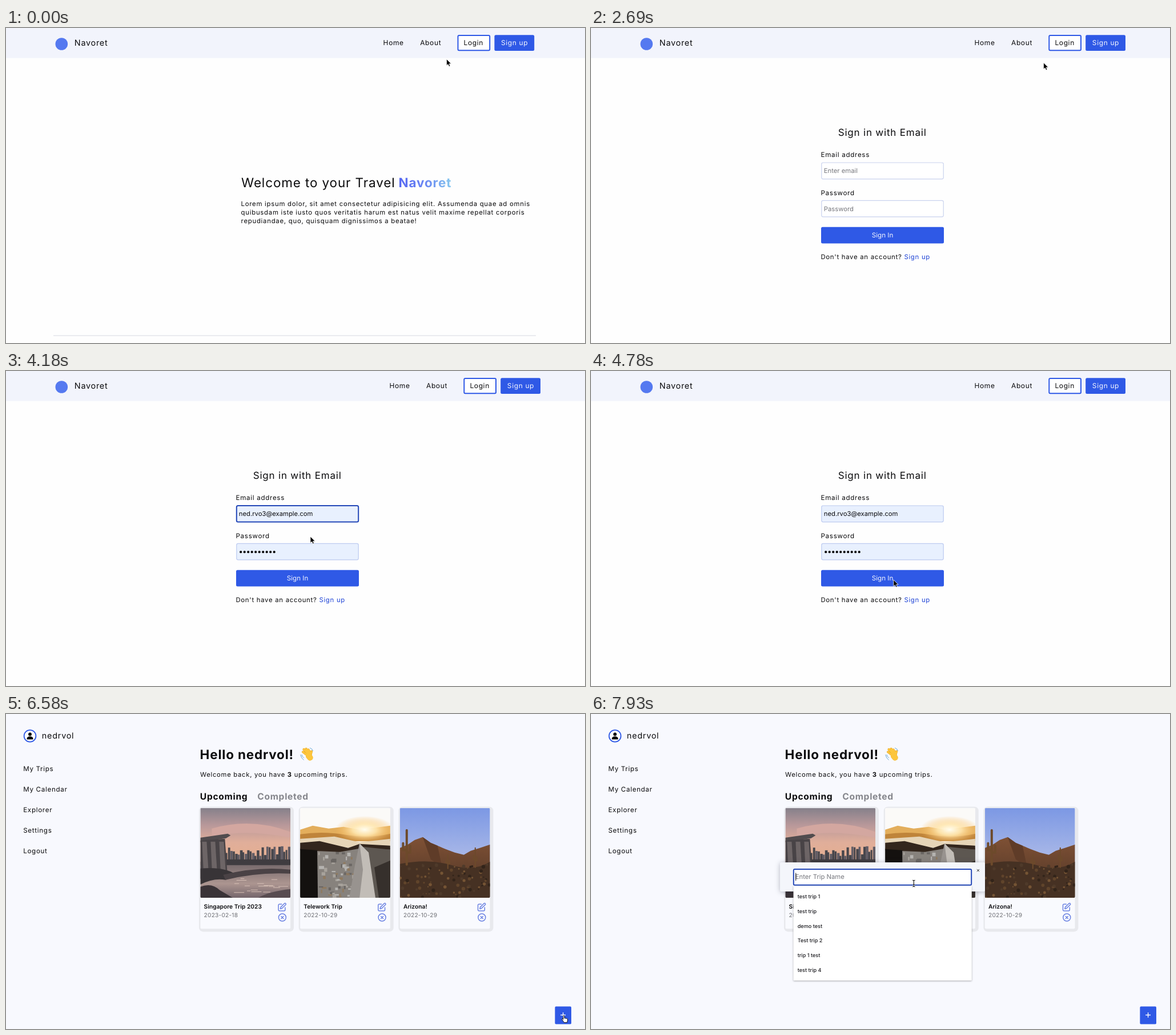
An HTML page that plays this animation: 1014x552 px, repeating every 8 s.

```html
<!DOCTYPE html>
<html lang="en">
<head>
<meta charset="utf-8">
<title>Travel planner walkthrough</title>
<style>
  html, body { margin: 0; width: 100%; height: 100%; overflow: hidden; background: #f8f9fe; }
  svg { display: block; width: 1014px; height: 552px; }
  text {
    font: 400 11.27px Inter, "Open Sans", sans-serif;
    font-optical-sizing: none;
    text-rendering: geometricPrecision;
    fill: #0b0b0d;
    white-space: pre;
  }
  .body { letter-spacing: .715px; }
  .intro { font-size: 11.4px; letter-spacing: .72px; }
  .label { font-size: 11.6px; letter-spacing: .7px; }
  .foot { font-size: 11.4px; letter-spacing: .7px; }
  .nav { font-size: 12px; letter-spacing: .63px; }
  .brand { font-size: 14.4px; letter-spacing: .75px; }
  .hero { font-size: 22.5px; letter-spacing: .86px; }
  .title { font-size: 17px; letter-spacing: .8px; }
  .hello { font-size: 22.5px; font-weight: 700; letter-spacing: .8px; }
  .tab { font-size: 15.6px; font-weight: 700; letter-spacing: .7px; }
  .name { font-size: 10.2px; font-weight: 600; letter-spacing: .05px; }
  .date { font-size: 10.2px; letter-spacing: .2px; fill: #6f7075; }
  .menu { font-size: 9.1px; }
  .pick { font-size: 9.1px; font-weight: 500; fill: #1c1c20; }
  .hint { fill: #76777d; }
  .light { fill: #f4f6ff; }
  .submit { font-size: 11.6px; }
  .gray { fill: #85868c; }
  .link { fill: #1f44d6; }
  .bold { font-weight: 700; }
  .shade { fill: url(#word); }
  .solid { fill: #2f59e6; }
  .field { fill: #fff; stroke: #c9d2ee; stroke-width: 1.2; }
  .field.filled { fill: #e8f0fe; stroke: #bccaf0; }
  .field.focus { stroke: #2448b8; stroke-width: 2; }
  .caret { stroke: #111; stroke-width: 1; }
  .dots { stroke: #0b0b0d; stroke-linecap: round; }
  .icon { fill: none; stroke: #6b82e2; stroke-width: 1.5; stroke-linecap: round; stroke-linejoin: round; }
  .pop { fill: #fff; filter: drop-shadow(0 1px 1.5px rgba(0, 0, 0, .32)); }
  .panel { fill: #f4f6fb; filter: drop-shadow(0 1px 4px rgba(20, 25, 50, .3)); }
  .mark { fill: #5579f0; }
  .off { display: none; }
</style>
</head>
<body>
<svg viewBox="0 0 1014 552" xmlns="http://www.w3.org/2000/svg">
  <defs>
    <linearGradient id="word"><stop stop-color="#5668f2"/><stop offset=".5" stop-color="#6a86f3"/><stop offset="1" stop-color="#86c8ee"/></linearGradient>
    <linearGradient id="dusk" x2="0" y2="1"><stop stop-color="#85808a"/><stop offset=".3" stop-color="#b8989a"/><stop offset=".6" stop-color="#e0ae9a"/><stop offset="1" stop-color="#e8b08e"/></linearGradient>
    <linearGradient id="bay" x2="0" y2="1"><stop stop-color="#6f6467"/><stop offset=".6" stop-color="#ac9590"/><stop offset="1" stop-color="#73646a"/></linearGradient>
    <linearGradient id="noon" x2="0" y2="1"><stop stop-color="#7c98e4"/><stop offset="1" stop-color="#b0bde8"/></linearGradient>
    <linearGradient id="rock" x2="0" y2="1"><stop stop-color="#7f5135"/><stop offset="1" stop-color="#4c3325"/></linearGradient>
    <radialGradient id="sun"><stop stop-color="#fffdf0"/><stop offset=".4" stop-color="#ffe7b0" stop-opacity=".9"/><stop offset="1" stop-color="#f9b85a" stop-opacity="0"/></radialGradient>
    <clipPath id="frame"><rect width="157.7" height="157.3" rx="2"/></clipPath>
  </defs>

  <g id="site">
    <rect width="1014" height="552" fill="#fefefe"/>
    <rect width="1014" height="52.6" fill="#f2f4fc"/>
    <circle class="mark" cx="97.3" cy="28" r="10.8"/>
    <text class="brand" x="119.8" y="31.4">Navoret</text>
    <g id="nav">
      <text class="nav" x="660.6" y="30.3">Home</text>
      <text class="nav" x="725.2" y="30.3">About</text>
      <rect x="791.5" y="13" width="55.7" height="26.2" rx="2" fill="#fff" stroke="#2f59e6" stroke-width="2"/>
      <text class="nav" x="801.6" y="30.3">Login</text>
      <rect class="solid" x="855.4" y="12.2" width="69.8" height="27.8" rx="2.5"/>
      <text class="nav light" x="867" y="30.3">Sign up</text>
    </g>
  </g>

  <g id="land">
    <text class="hero" x="412" y="279.3">Welcome to your Travel</text>
    <text class="hero bold shade" x="687.4" y="279.3">Navoret</text>
    <text class="intro" x="411.6" y="311.7">Lorem ipsum dolor, sit amet consectetur adipisicing elit. Assumenda quae ad omnis</text>
    <text class="intro" x="411.6" y="327">quibusdam iste iusto quos veritatis harum est natus velit maxime repellat corporis</text>
    <text class="intro" x="411.6" y="342.3">repudiandae, quo, quisquam dignissimos a beatae!</text>
    <path d="M83 539H928" stroke="#d6d8e0"/>
  </g>

  <g id="login">
    <text class="title" x="432.7" y="189.3">Sign in with Email</text>
    <text class="label" x="402.5" y="226.4">Email address</text>
    <rect id="email" class="field" x="403.8" y="236" width="213.4" height="28.6" rx="2.5"/>
    <text id="ask" class="hint" x="407.8" y="254">Enter email</text>
    <text id="typed" x="407.8" y="254">ned.rvo3@example.com</text>
    <path id="caret" class="caret" d="M408.7 243.5V257"/>
    <text class="label" x="402.5" y="293">Password</text>
    <rect id="pass" class="field" x="403.8" y="302.4" width="213.4" height="28.4" rx="2.5"/>
    <text id="askPass" class="hint" x="407.8" y="320.6">Password</text>
    <path id="secret" class="dots" d="M411.2 317.2h59" stroke-width="4.3" stroke-dasharray="0 6.5"/>
    <rect class="solid" x="403" y="348.8" width="215" height="28.8" rx="2.5"/>
    <text class="submit light" x="491.8" y="367.2">Sign In</text>
    <text class="foot" x="402.4" y="405.3">Don't have an account? <tspan class="link">Sign up</tspan></text>
    <g id="saved">
      <rect class="pop" x="403" y="266" width="215" height="158.4" rx="1.5"/>
      <rect id="hover" x="403" y="272" width="215" height="41" fill="#ececee"/>
      <g id="accounts"></g>
      <path d="M403 396.5H618" stroke="#dcdde0"/>
      <circle cx="416" cy="410.5" r="2.7" fill="none" stroke="#55575c" stroke-width="2"/>
      <circle cx="416" cy="410.5" r="4" fill="none" stroke="#55575c" stroke-width="1.3" stroke-dasharray="1.9 2.29"/>
      <text class="menu" x="428.6" y="413.8">Manage Passwords...</text>
    </g>
  </g>

  <g id="dash">
    <rect width="1014" height="552" fill="#f8f9fe"/>
    <circle cx="42" cy="38.5" r="10.4" fill="#fff" stroke="#2f59e6" stroke-width="1.8"/>
    <circle cx="42" cy="35.4" r="2.9"/>
    <path d="M36.6 44.4v-1.3c0-2.6 2.6-3.9 5.4-3.9s5.4 1.3 5.4 3.9v1.3z"/>
    <text class="brand" x="62.8" y="43">nedrvol</text>
    <g id="side"></g>
    <text class="hello" x="339.6" y="79.3">Hello nedrvol!</text>
    <g fill="none" stroke-linecap="round">
      <g id="palm"><path d="M528.5 73l-8.5-6.5M529.5 70l-8-8M531 68.5l-5.5-7.5M533 69l-3.5-6.5M533 74l2-8.5"/><path d="M530 73.5l2.5 3" stroke-width="10"/></g>
      <path d="M515.8 71.5q1 6 5.5 9M518 71.5q.8 3.5 3.5 5.5M532.5 59.5q4 1 5 5" stroke="#6aa9d8"/>
    </g>
    <text class="body" x="340" y="109.5">Welcome back, you have <tspan class="bold">3</tspan> upcoming trips.</text>
    <text class="tab" x="339.8" y="149.8">Upcoming</text>
    <text class="tab gray" x="440.2" y="149.8">Completed</text>
    <g id="cards"></g>
    <rect class="solid" x="961.4" y="512.6" width="28.6" height="31" rx="1.8"/>
    <path d="M971.2 527.5h8.8M975.6 523.1v8.8" stroke="#fff" stroke-width="1.3"/>
    <g id="modal">
      <rect class="panel" x="331" y="260" width="359" height="51" rx="2"/>
      <path d="M675.8 272l4.2 4.2m0-4.2l-4.2 4.2" stroke="#333"/>
      <rect id="trip" class="field" x="354.8" y="272" width="311.4" height="27.8" rx="2"/>
      <text class="hint" x="357.8" y="289.3">Enter Trip Name</text>
      <g id="recent">
        <path class="caret" d="M358.7 278.5V292"/>
        <rect class="pop" x="354.5" y="301" width="312.2" height="166" rx="1"/>
      </g>
    </g>
  </g>

  <g id="cursor" stroke-linejoin="round">
    <path id="arrow" d="M0 0V11.4L2.6 9l1.8 4 2-.9-1.7-3.9H8.3z" fill="#000" stroke="#fff" stroke-width=".8"/>
    <path id="hand" d="M-1.2 6.8V1a1.1 1.1 0 0 1 2.2 0V4.8c.4-.8 1.8-.6 2 .3.4-.6 1.7-.4 1.9.4.5-.4 1.6-.1 1.6.9v2.1c0 1.4-.9 2-1 3.7H.3c-.3-1.5-2.4-3.3-3.6-5.1-.6-1 .7-1.9 1.4-1.1z" fill="#fff" stroke="#111"/>
    <g id="beam" fill="none">
      <path class="bar" stroke="#fff" stroke-width="2.4"/>
      <path class="bar" stroke="#111" stroke-width="1.1"/>
    </g>
  </g>
</svg>

<script>
const LOOP = 8000, TICK = 149.7, LEAD = 14;
const $ = id => document.getElementById(id);
const add = (id, markup) => $(id).insertAdjacentHTML('beforeend', markup);
const text = (x, y, cls, str) => `<text class="${cls}" x="${x}" y="${y}">${str}</text>`;
const shape = (fill, d) => `<path fill="${fill}" d="${d}"/>`;
const box = (fill, x, y, w, h) => `<rect fill="${fill}" x="${x}" y="${y}" width="${w}" height="${h}"/>`;

let seed = 11;
const rand = (lo, hi) => lo + (hi - lo) * ((seed = (seed * 16807) % 2147483647) / 2147483647);
const many = (n, make) => Array.from({ length: n }, (_, k) => make(k)).join('');

const city = () =>
  box('url(#dusk)', 0, 0, 158, 100) +
  shape('#d3a7a0', 'M20 36Q90 16 158 42V52Q80 36 20 50z') +
  box('url(#bay)', 0, 94, 158, 64) +
  many(28, k => {
    const h = rand(14, 31);
    return box(k % 3 ? '#47464c' : '#625d66', 40 + k * 4.2, 98 - h, rand(3, 5), h);
  }) +
  box('#3f3c40', 38, 90, 120, 10) +
  shape('#514c4e', 'M0 52L48 45 53 48 45 53 0 60z') +
  shape('#484346', 'M0 57L43 54 48 124H0z') +
  many(3, k => shape('#6d6566', `M${3 + k * 15} 59h8l4 64h-9z`)) +
  shape('#383437', 'M0 106Q40 102 62 116L44 126Q24 122 0 134z') +
  shape('#4a4245', 'M40 117Q100 102 158 108V115Q100 112 44 126z') +
  many(16, () => box('#d6bfb5', rand(50, 140), rand(122, 148), rand(6, 18), 1)) +
  shape('#3a3337', 'M0 138Q20 130 34 144L58 158H0z') +
  shape('#584c50', 'M158 142Q120 146 100 158H158z');

const road = () =>
  box('#fbfaf8', 0, 0, 158, 70) +
  shape('#e3ae5c', 'M0 38L22 31 50 36 76 33 104 38 158 31V58H0z') +
  shape('#bf843a', 'M0 46Q40 40 80 47T158 45V58H0z') +
  '<ellipse cx="113" cy="38" rx="52" ry="24" fill="url(#sun)"/>' +
  box('#87827d', 0, 70, 158, 88) +
  many(60, k => box(['#a8a39c', '#6a6663', '#8f7a60', '#b5b3b0'][k % 4], rand(32, 92), rand(76, 154), rand(2, 9), rand(2, 7))) +
  shape('#e6d5b8', 'M0 54L60 50 104 60 158 54V66L104 70 0 66z') +
  shape('#33261d', 'M0 61L34 58 84 70 104 63 158 66V73L104 71 70 77 0 74z') +
  shape('#14110f', 'M0 72L30 74 31 158H0z') +
  shape('#5d5751', 'M110 68L158 73V158H128z') +
  shape('#36302c', 'M130 104L158 92V158H138z') +
  shape('#c2bdb7', 'M104 62L120 78 132 158H98z') +
  shape('#98938f', 'M104 62L110 108 104 158H86L96 100z');

const cactus = (x, y, h, w) =>
  `<path d="M${x} ${y + h}V${y}M${x - w * 1.6} ${y + h * .38}v${h * .2}h${w * 1.6}M${x + w * 1.5} ${y + h * .45}v${h * .2}h${-w * 1.5}"
    fill="none" stroke="#6d4a2b" stroke-width="${w}" stroke-linecap="round"/>`;

const desert = () =>
  box('url(#noon)', 0, 0, 158, 100) +
  shape('url(#rock)', 'M0 70L14 64 26 56 40 51 54 61 66 66 80 72 96 78 112 82 124 75 140 70 158 64V158H0z') +
  shape('#5f3c28', 'M40 51L54 61 66 66 74 104 54 90z') +
  shape('#463123', 'M0 98Q50 88 90 100T158 94V158H0z') +
  many(90, k => `<circle cx="${rand(0, 158)}" cy="${rand(98, 157)}" r="${rand(1, 3.2)}"
    fill="${['#32241a', '#60442b', '#4f3a2a', '#755434'][k % 4]}"/>`) +
  cactus(12, 39, 60, 4) + cactus(84, 82, 24, 2) + cactus(132, 70, 34, 2);

const card = (k, name, date, photo) => `<g transform="translate(${340.4 + k * 174.7} 164.8)">
  <rect x="-2.4" y="-2.4" width="166" height="219" rx="7" fill="#e8e9ed"/>
  <rect width="157.7" height="211.5" rx="2" fill="#f9fafe"/>
  <g clip-path="url(#frame)">${photo()}</g>
  ${text(6.2, 176.3, 'name', name)}${text(6.2, 191.4, 'date', date)}
  <g class="icon">
    <path d="M142.5 168.5h-4a1.8 1.8 0 0 0-1.8 1.8v8a1.8 1.8 0 0 0 1.8 1.8h8.2a1.8 1.8 0 0 0 1.8-1.8v-4"/>
    <path d="M147.2 167.2a1.5 1.5 0 0 1 2.2 2.2l-6.6 6.5-2.8.7.7-2.8z"/>
    <circle cx="143.5" cy="191.7" r="6.5"/><path d="M141.5 189.7l4 4m0-4l-4 4"/>
  </g></g>`;

add('cards', card(0, 'Singapore Trip 2023', '2023-02-18', city) +
  card(1, 'Telework Trip', '2022-10-29', road) +
  card(2, 'Arizona!', '2022-10-29', desert));

add('side', ['My Trips', 'My Calendar', 'Explorer', 'Settings', 'Logout']
  .map((s, k) => text(30.2, 100.2 + k * 36, 'label', s)).join(''));

add('accounts', [['ned.rvo3@example.com', 10], ['Tilmo', 13], ['tilmo@example.com', 13]].map(([who, n], k) => {
  const y = 288 + k * 41.5;
  return `<circle cx="416" cy="${y + 5}" r="4.5" fill="#3a57b4"/>` + text(428.6, y, 'menu', who) +
    `<path class="dots" d="M430.6 ${y + 12.7}h${(n - 1) * 4.5 + .1}" stroke-width="1.9" stroke-dasharray="0 4.5"/>`;
}).join(''));

add('recent', ['test trip 1', 'test trip', 'demo test', 'Test trip 2', 'trip 1 test', 'test trip 4']
  .map((s, k) => text(361.7, 323.2 + k * 25.75, 'pick', s)).join(''));

const palm = $('palm').innerHTML;
$('palm').innerHTML = `<g stroke="#e59a1c" stroke-width="4">${palm}</g><g stroke="#fcc63c" stroke-width="3.2">${palm}</g>`;

document.querySelectorAll('.bar').forEach(p =>
  p.setAttribute('d', 'M-2.3-5.7Q0-5.7 0-4.3Q0-5.7 2.3-5.7M0-4.3V4.3M-2.3 5.7Q0 5.7 0 4.3Q0 5.7 2.3 5.7M-1.4 1.8H1.4'));

// Pointer stops: tick, x, y, shape
const stops = [
  [0, 771.5, 54.5, 'arrow'], [1, 771.5, 54.5, 'arrow'], [6, 793, 51, 'arrow'], [8, 793, 51, 'arrow'],
  [10, 817, 37, 'hand'], [11, 817, 37, 'hand'], [12, 816.5, 27.8, 'hand'], [16, 816.5, 27.8, 'hand'],
  [17, 812, 46, 'arrow'], [23, 549, 246, 'beam'], [25, 549, 247, 'beam'], [26, 540, 277, 'arrow'],
  [27, 533, 290, 'arrow'], [28, 533, 290, 'arrow'], [31, 529.8, 366, 'arrow'], [38, 529.8, 366, 'arrow'],
  [43, 966, 519, 'arrow'], [44, 977, 528.5, 'hand'], [45, 977, 528.5, 'hand'], [46, 973, 521, 'hand'],
  [47, 920, 482, 'arrow'], [50, 600, 318, 'arrow'], [51, 572, 298, 'beam'], [52, 565.3, 297, 'beam']
];

function pointer(i) {
  const k = stops.findLastIndex(s => s[0] <= i);
  const [t0, x0, y0, kind] = stops[k];
  const [t1, x1, y1] = stops[k + 1] || [t0 + 1, x0, y0];
  const u = Math.min(1, (i - t0) / (t1 - t0)), e = u * u * (3 - 2 * u);
  return { x: x0 + (x1 - x0) * e, y: y0 + (y1 - y0) * e, kind };
}

const show = (id, on) => $(id).classList.toggle('off', !on);
const mark = (id, cls, on) => $(id).classList.toggle(cls, on);

function draw(i) {
  const signing = i >= 15 && i < 34, focus = i >= 24 && i < 32, filled = i >= 26;
  show('site', i < 34);
  show('land', i < 15);
  show('login', signing);
  show('dash', i >= 34);
  $('nav').setAttribute('transform', `translate(${signing ? 10.8 : 0} 0)`);

  mark('email', 'focus', focus);
  mark('email', 'filled', filled);
  mark('pass', 'filled', filled);
  show('ask', !filled);
  show('askPass', !filled);
  show('typed', filled);
  show('secret', filled);
  show('caret', focus && !filled);
  show('saved', i >= 24 && i < 28);
  show('hover', filled);

  show('modal', i >= 46);
  show('recent', i >= 53);
  mark('trip', 'focus', i >= 53);

  const p = pointer(i);
  $('cursor').setAttribute('transform', `translate(${p.x} ${p.y})`);
  ['arrow', 'hand', 'beam'].forEach(id => show(id, id === p.kind));
}

let last = -1;
const start = performance.now();
function loop() {
  const i = Math.floor(((performance.now() - start) % LOOP + LEAD) / TICK);
  if (i !== last) draw(last = i);
  requestAnimationFrame(loop);
}
loop();
</script>
</body>
</html>
```
